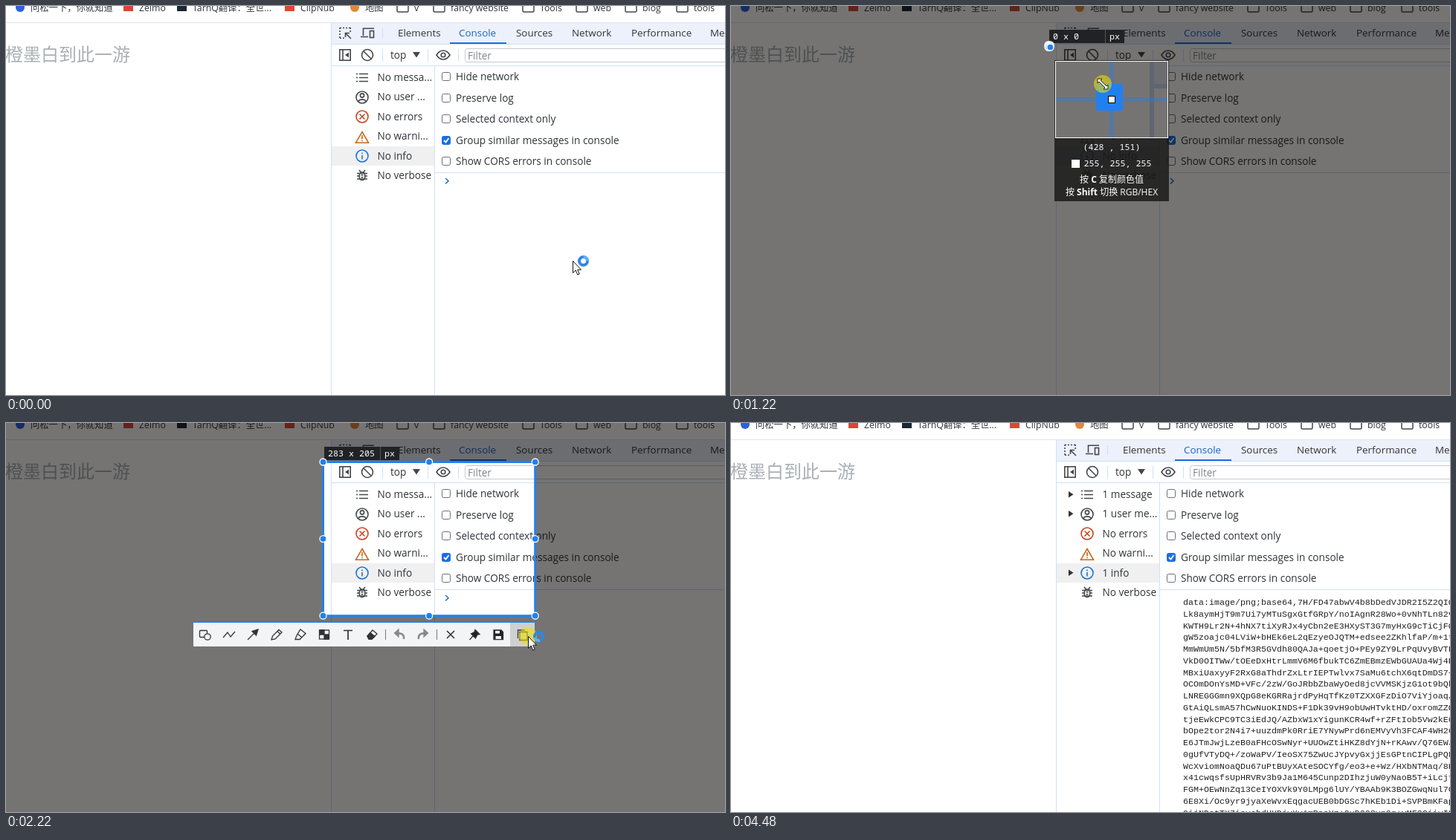
Animation, 967 px wide and 524 px high, one loop 5150 ms. Source, as an HTML page:

```html
<!DOCTYPE html>
<html lang="zh-CN">
<head>
<meta charset="utf-8">
<title>Screenshot to console</title>
<style>
html, body { margin: 0; width: 100%; height: 100%; overflow: hidden; background: #fff; }
svg { display: block; width: 967px; height: 524px; }
text { font-family: "Open Sans", "Noto Sans CJK SC", "Noto Sans CJK", sans-serif; font-size: 13.6px; fill: #303338; white-space: pre; }
.mark text { font-size: 12.3px; }
.tabs text { font-size: 13.4px; }
.mono { font-family: "Noto Sans Mono", "DejaVu Sans Mono", monospace; font-size: 11.67px; fill: #fff; }
.tip { font-size: 12px; fill: #fff; text-anchor: middle; }
.log text { font-family: "Liberation Mono", monospace; font-size: 11.67px; fill: #222; }
.ico { fill: none; stroke: #44474b; stroke-width: 1.6; }
.tool { fill: none; stroke: #333; stroke-width: 1.3; }
.line { stroke: #cfe0fb; fill: none; }
</style>
</head>
<body>
<svg viewBox="0 0 967 524">
  <defs>
    <clipPath id="lens"><rect x="1" y="1" width="152" height="104"/></clipPath>
    <path id="arrow" d="M.5 .5V16.5L4.2 13 6.8 19 9.2 18 6.7 12.2H11.5Z" fill="#fff" stroke="#111"/>
  </defs>
  <g id="screen">
    <rect width="967" height="524" fill="#fff"/>
    <g class="mark" id="marks"></g>
    <path d="M0 22.5H967" stroke="#e1e4e9"/>
    <text x="-1" y="74" style="font-size:24px;fill:#a9b0b6">橙墨白到此一游</text>
    <circle id="dot" cx="0" cy="261" r="2" fill="#777"/>

    <rect x="438" y="23" width="529" height="29" fill="#ecf1fb"/>
    <g class="tabs" id="tabs"></g>
    <rect x="597" y="49" width="76" height="2.5" fill="#1a6fe0"/>
    <path class="line" d="M437.5 23V524M438 51.5H967M438 80.5H967M576.5 81V524M577 224.5H967"/>
    <path class="line" d="M506.5 30V43M506.5 58V75M567.5 58V75M608.5 58V75"/>
    <g class="ico">
      <path d="M449 29.5H463M449 29V43M463.2 29V35M449 43.2H455" stroke-dasharray="2 2"/>
      <path d="M464 44L457 37M456.5 42V36.5H462"/>
      <path d="M495 30.3H480.5V40M477 41.5H487"/>
      <rect x="489.5" y="33.5" width="5" height="9"/>
      <rect x="448.8" y="58.8" width="14.4" height="14.4"/>
      <path d="M453 59V73"/>
      <path d="M461 62.5V69.5L456 66Z" fill="#44474b" stroke="none"/>
      <circle cx="486" cy="66" r="7.5"/>
      <path d="M481 61L491 71"/>
      <path d="M579 66C584 58 592 58 597 66 592 74 584 74 579 66Z"/>
      <circle cx="588" cy="66" r="2.8"/>
    </g>
    <text x="517" y="71">top</text>
    <path d="M547 62H557L552 69.5Z" fill="#44474b"/>
    <rect x="617.5" y="57.5" width="360" height="18" rx="3" fill="#fff" stroke="#c4c9d0"/>
    <text x="621" y="72" style="fill:#80868b">Filter</text>

    <rect x="438" y="189" width="138" height="26" fill="#f0f0f0"/>
    <g class="ico">
      <path d="M475 91.5H487M475 96.5H487M475 101.5H487"/>
      <path d="M471 91.5H473M471 96.5H473M471 101.5H473"/>
      <circle cx="479" cy="123" r="8"/>
      <circle cx="479" cy="120.5" r="2.6"/>
      <path d="M473.5 128.5C476 125 482 125 484.5 128.5"/>
      <g stroke="#cb441f"><circle cx="479" cy="149" r="8"/><path d="M475.5 145.5L482.5 152.5M482.5 145.5L475.5 152.5"/></g>
      <path d="M479 169.5L487.5 184.2H470.5ZM479 174V179.5M479 180.8V182.3" stroke="#c4671d"/>
      <path d="M479 201V206.5M479 197.5V199.2" stroke="#1a73d8"/>
      <circle cx="479" cy="202" r="8" stroke="#1a73d8"/>
      <rect x="475.3" y="224" width="7.4" height="10.5" rx="3.5"/>
      <path d="M472 225.5H486M472 229H475M483 229H486M472 233H486"/>
      <path d="M477.5 227.8H480.5M477.5 230.8H480.5M475 221L477.5 224M483 221L480.5 224"/>
    </g>
    <g id="side"></g>
    <path id="open" d="M454 92L460.5 96.3 454 100.6ZM454 118L460.5 122.3 454 126.6ZM454 197.5L460.5 201.8 454 206Z" fill="#333"/>
    <g id="checks"></g>
    <path id="prompt" d="M591 232L595 235.7 591 239.4" fill="none" stroke="#1a6fe0" stroke-width="1.5"/>
    <g class="log" id="log"></g>

    <g id="sel">
      <path id="dim" fill="#050300" fill-opacity=".55" fill-rule="evenodd"/>
      <path id="frame" fill="none" stroke="#2180f0" stroke-width="3"/>
    </g>
  </g>

  <g id="grip">
    <rect x="428" y="32" width="101" height="18" fill="#212225"/>
    <path d="M503.5 32V50" stroke="#555"/>
    <text class="mono" id="size" x="433" y="45"></text>
    <text class="mono" x="509" y="45">px</text>
    <g id="knobs" fill="#2180f0" stroke="#fff" stroke-width="1.3"></g>
  </g>

  <g id="bar">
    <rect x="252" y="268" width="459" height="33" fill="#f3f4f5"/>
    <rect id="hover" x="678" y="269" width="33" height="32" fill="#cfd0d1"/>
    <rect x="252" y="267.5" width="459" height="1.5" fill="#2180f0"/>
    <path d="M510.5 278V292M579.5 278V292" stroke="#777"/>
    <g class="tool">
      <rect x="260.5" y="279.5" width="10" height="9" rx="1"/>
      <circle cx="271" cy="288" r="4.2" fill="#f3f4f5"/>
      <path d="M292 289L298 282 302 288 308 281"/>
      <path d="M325 292L338 279"/>
      <path d="M339 278L336.5 286 331 280.5Z" fill="#333"/>
      <path d="M357 292L358.5 287 367 278.5 371 282 362 291ZM365 280.5L369 284.5"/>
      <path d="M389 291.5H395L403 283.5 396 278 391 286ZM392 284L398 289"/>
      <rect x="421.5" y="279" width="13" height="12"/>
      <path d="M422 279H428V285H422ZM428 285H434V291H428Z" fill="#333"/>
      <path d="M454 279.5H466M460 279.5V292" stroke-width="1.7"/>
      <path d="M486 287L493 279 499 284 492 291H488Z"/>
      <path d="M490 282.5L496 287.5 492 291H488L486 287Z" fill="#333"/>
      <g stroke="#888">
        <path d="M535 291C536 285 532 283 525 283M555 291C554 285 558 283 565 283" stroke-width="2.5"/>
        <path d="M528 278L522.5 283 528 288ZM562 278L567.5 283 562 288Z" fill="#888"/>
      </g>
      <path d="M593 280L603 290M603 280L593 290" stroke-width="1.6"/>
      <path d="M631 278.5L637 284.5 634 285 631.5 290 625.5 284 630 281.5ZM628 287L623.5 292" fill="#222"/>
      <path d="M656 279H666L668.5 281.5V291.5H656Z" fill="#222"/>
      <path d="M658 280H664V283.5H658ZM658.5 287H666V291H658.5Z" fill="#f3f4f5" stroke="none"/>
      <path d="M688.5 290V279H698M691 281.5H701V292.5H691Z"/>
    </g>
  </g>

  <g id="mag">
    <rect width="154" height="106" fill="#fff"/>
    <g clip-path="url(#lens)">
      <use id="zoom" href="#screen"/>
      <path d="M74 1V50H1V56H74V105H80V56H153V50H80V1Z" fill="#1e7df0" fill-opacity=".35"/>
    </g>
    <rect x=".5" y=".5" width="153" height="105" fill="none" stroke="#2a2a2a"/>
    <rect x="1.5" y="1.5" width="151" height="103" fill="none" stroke="#fff"/>
    <rect x="72.5" y="48.5" width="9" height="9" fill="#fff" stroke="#000"/>
    <rect y="106" width="154" height="84" fill="#1a1a1a" fill-opacity=".84"/>
    <text class="mono" id="pos" x="77" y="121" text-anchor="middle"></text>
    <rect x="23" y="134" width="11" height="11" fill="#fff"/>
    <text class="mono" x="39.5" y="143">255, 255, 255</text>
    <text class="tip" x="77" y="165">按 <tspan font-weight="700">C</tspan> 复制颜色值</text>
    <text class="tip" x="77" y="182">按 <tspan font-weight="700">Shift</tspan> 切换 RGB/HEX</text>
  </g>

  <g id="cursor">
    <circle id="press" r="12" fill="#f0e000" fill-opacity=".58"/>
    <g id="ring" fill="none" stroke-width="4">
      <circle cx="14.5" cy=".5" r="5.5" stroke="#2f86e6"/>
      <path id="spin" d="M14.5 -5A5.5 5.5 0 0 1 20 .5" stroke="#5fb0f5"/>
    </g>
    <use id="c-arrow" href="#arrow"/>
    <g id="c-cross"><path d="M-10 .5H11M.5 -10V11" stroke="#000" stroke-width="3"/><path d="M-9 .5H10M.5 -9V10" stroke="#fff"/></g>
    <path id="c-size" d="M-7 -7H-1L-3 -5 5 3 7 1V7H1L3 5 -5 -3 -7 -1Z" fill="#fff" stroke="#222"/>
    <path id="c-beam" d="M-3 -7.5H-1L.5 -6.5 2 -7.5H4M.5 -6.5V7.5M-3 8.5H-1L.5 7.5 2 8.5H4" fill="none" stroke="#111" stroke-width="1.2"/>
  </g>
</svg>
<script>
const LOOP = 5150, STEP = 67;
const $ = id => document.getElementById(id);
const show = (id, on) => $(id).setAttribute("visibility", on ? "visible" : "hidden");
const label = (x, y, s) => `<text x="${x}" y="${y}">${s}</text>`;

// bookmarks
const marks = [[33, "问松一下，你就知道"], [179, "Zelmo"], [251, "TarnQ翻译：全世..."], [396, "ClipNub"], [483, "地图"],
  [549, "v"], [598, "fancy website"], [718, "Tools"], [790, "web"], [856, "blog"], [925, "tools"]];
const badges = ["#2a62dc", "#dc4437", "#1c2733", "#dd4930", "#e2883c"];
const folder = x => `<rect x="${x - 23}" y="-6" width="15" height="14" rx="1.5" fill="none" stroke="#44474b" stroke-width="1.5"/>`;
const badge = (x, i) => i % 4
  ? `<rect x="${x - 21}" y="-5" width="13" height="12" fill="${badges[i]}"/>`
  : `<circle cx="${x - 14}" cy="2" r="6" fill="${badges[i]}"/>`;
$("marks").innerHTML = marks.map(([x, s], i) => (i > 4 ? folder(x) : badge(x, i)) + label(x, 7, s)).join("");

$("tabs").innerHTML = [[527, "Elements"], [609, "Console"], [686, "Sources"], [761, "Network"], [841, "Performance"], [947, "Memory"]]
  .map(([x, s]) => label(x, 41, s)).join("");
$("tabs").children[1].style.fill = "#1a63c8";

const before = ["No messa...", "No user ...", "No errors", "No warni...", "No info", "No verbose"];
const after = ["1 message", "1 user me...", "No errors", "No warni...", "1 info", "No verbose"];
$("side").innerHTML = before.map((s, i) => label(499.5, Math.round(101 + i * 26.4), s)).join("");

$("checks").innerHTML = ["Hide network", "Preserve log", "Selected context only", "Group similar messages in console", "Show CORS errors in console"]
  .map((s, i) => {
    const y = Math.round(95 + i * 28.6), on = i === 3;
    const [fill, edge] = on ? ["#1a6fe0", "#1a6fe0"] : ["#fff", "#6b6f75"];
    return `<rect x="586.5" y="${y - 5.5}" width="11" height="11" rx="2" fill="${fill}" stroke="${edge}"/>`
      + (on ? `<path d="M589 ${y}L591.5 ${y + 2.5} 595.5 ${y - 3}" fill="none" stroke="#fff" stroke-width="1.8"/>` : "")
      + label(605, y + 5, s);
  }).join("");

// console output: seeded random characters
let seed = 77;
const rand = n => (seed = (seed * 16807) % 2147483647) % n;
const range = (from, n) => Array.from({ length: n }, (_, i) => String.fromCharCode(from.charCodeAt(0) + i)).join("");
const letters = range("A", 26) + range("a", 26) + range("0", 10) + "+/";
const noise = n => Array.from({ length: n }, () => letters[rand(64)]).join("");
const head = ["data", "image/png"].join(":") + ";" + "base" + 64 + ",";
$("log").innerHTML = Array.from({ length: 19 }, (_, i) =>
  label(608, 245 + i * 15.75, i ? noise(52) : head + noise(30))).join("");

$("knobs").innerHTML = "<circle r='4.5'/>".repeat(8);

// pointer: time, x, y
const path = [
  [0, 762, 343], [67, 762, 343], [335, 536, 150], [469, 463, 82], [536, 450, 77],
  [740, 432, 60], [870, 420, 54], [1005, 426, 55], [1072, 428, 54], [1139, 428, 54], [1206, 500, 105],
  [1340, 693, 231], [1407, 692, 230], [1608, 705, 248], [1742, 711, 259], [1809, 711, 260],
  [2077, 702, 287], [2345, 702, 287], [2412, 627, 250], [2546, 345, 140], [2680, 80, 54], [2747, 80, 54],
  [2814, 84, 57], [3100, 84, 57], [3550, 88, 69], [3640, 90, 69], [4130, 527, 302], [4430, 862, 522]
];
function at(t) {
  const i = path.findIndex(k => k[0] > t);
  if (i < 1) return path[i ? path.length - 1 : 0].slice(1);
  const a = path[i - 1], b = path[i], p = (t - a[0]) / (b[0] - a[0]);
  return [1, 2].map(j => Math.round(a[j] + (b[j] - a[j]) * p));
}

function select(x, y) {
  const l = 426.5, t = 52.5, r = Math.max(x + .7, l + 3), b = Math.max(y + .7, t + 3);
  const box = `M${l} ${t}H${r}V${b}H${l}Z`;
  $("dim").setAttribute("d", "M0 0H967V524H0Z" + box);
  $("frame").setAttribute("d", box);
  $("size").textContent = `${Math.max(0, x - 428)} x ${Math.max(0, y - 54)}`;
  const cx = (l + r) / 2, cy = (t + b) / 2;
  [[l, t], [cx, t], [r, t], [l, cy], [r, cy], [l, b], [cx, b], [r, b]].forEach(([kx, ky], i) => {
    const k = $("knobs").children[i];
    k.setAttribute("cx", kx);
    k.setAttribute("cy", ky);
  });
}

function draw(time) {
  const t = Math.floor(time / STEP) * STEP;
  const [x, y] = at(t), [mx, my] = at(t - STEP);
  const picking = t >= 335 && t < 1809;
  const drag = t >= 1139 && t < 1809;
  const shade = t >= 1139 && t < 2278;
  const logged = t >= 3780;
  const beam = !picking && x < 170 && y > 42 && y < 86;

  show("dot", t >= 335 && t < 1139);
  show("sel", shade);
  show("grip", shade);
  if (shade) select(...(drag ? [mx, my] : [711, 259]));
  show("bar", t >= 1809 && shade);
  show("hover", t >= 2010 && shade);

  $("mag").style.display = picking ? "" : "none";
  if (picking) {
    $("mag").setAttribute("transform", `translate(${mx + 7} ${my + 19})`);
    $("zoom").setAttribute("transform", `translate(77 53) scale(6) translate(${-mx - .5} ${-my - .5})`);
    $("pos").textContent = `(${mx} , ${my + 97})`;
  }

  $("cursor").setAttribute("transform", `translate(${x} ${y})`);
  $("cursor").style.display = t < 4420 ? "" : "none";
  show("press", drag || (t >= 2144 && t < 2278));
  show("ring", t < 335 || (t >= 2144 && t < 2412));
  $("spin").setAttribute("transform", `rotate(${t * .4} 14.5 .5)`);
  show("c-cross", picking && !drag);
  show("c-size", drag);
  show("c-beam", beam);
  show("c-arrow", !picking && !beam);

  (logged ? after : before).forEach((s, i) => { $("side").children[i].textContent = s; });
  show("open", logged);
  show("log", logged);
  show("prompt", !logged);
}

const start = performance.now();
function tick() {
  draw((performance.now() - start) % LOOP);
  requestAnimationFrame(tick);
}
tick();
</script>
</body>
</html>
```
